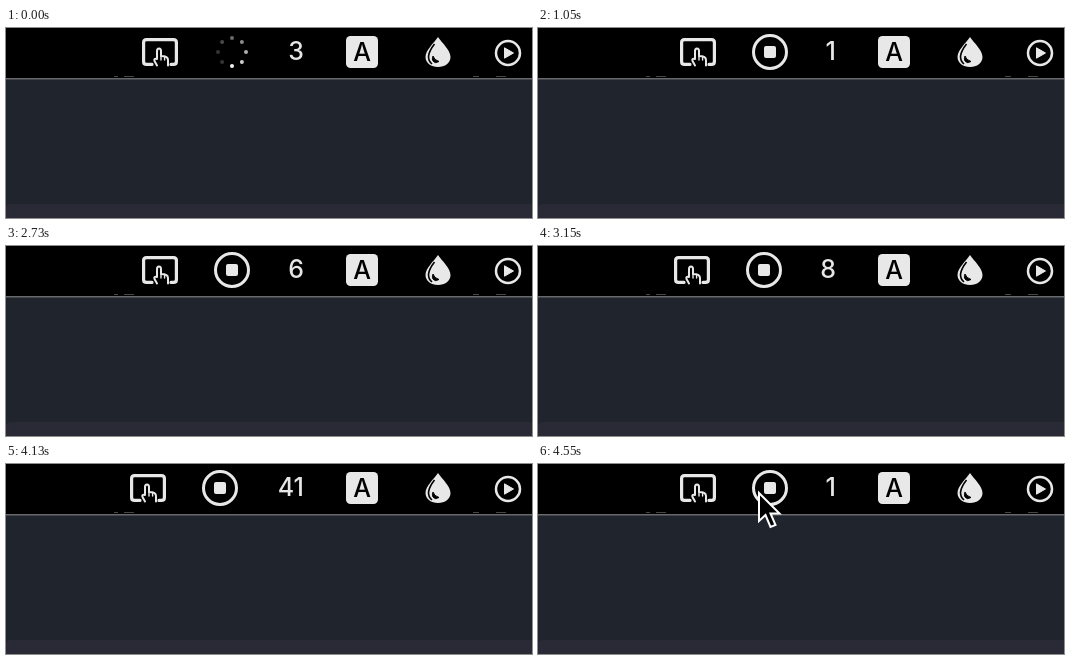
Recreate the animation shown at these times as an HTML page. Size 526x190 px, loop 4620 ms.

```html
<!DOCTYPE html>
<html lang="en">
<head>
<meta charset="utf-8">
<title>Menu bar status</title>
<style>
  html, body { margin: 0; width: 100%; height: 100%; overflow: hidden; background: #20252d; }
  svg { display: block; width: 526px; height: 190px; }
  text { font-family: Inter, "Liberation Sans", sans-serif; font-weight: 500; }
</style>
</head>
<body>
<svg viewBox="0 0 526 190" xmlns="http://www.w3.org/2000/svg">
  <rect width="526" height="190" fill="#20252d"/>
  <path d="M0 190V178Q2 176 6 176H526V190Z" fill="#292a36"/>
  <rect width="526" height="50" fill="#000"/>
  <rect y="50" width="526" height="1.5" fill="#66686b"/>
  <path d="M108 48.5h4M118 48.5h10M467 48.5h6M490 48.5h10" stroke="#777" stroke-width="1" opacity=".6"/>

  <g id="pad" fill="none" stroke="#e8e8e8" stroke-linejoin="round" stroke-linecap="round">
    <path stroke-width="3.2" d="M10 36.4H4.6Q1.6 36.4 1.6 33.4V14.6Q1.6 11.6 4.6 11.6H31.4Q34.4 11.6 34.4 14.6V33.4Q34.4 36.4 31.4 36.4H29"/>
    <path stroke-width="2" d="M15 37.5L12.5 33Q11.5 30 15 31V23Q15 20.5 17 20.5T19 23V28Q26 28 26 32V37.5"/>
    <path stroke-width="1.4" d="M19 28V32M22.6 29V32"/>
  </g>

  <g id="spin" fill="#f2f2f2"></g>
  <g id="stop">
    <circle r="16.5" fill="none" stroke="#e8e8e8" stroke-width="3"/>
    <rect x="-6" y="-6" width="12" height="12" rx="2" fill="#e8e8e8"/>
  </g>

  <text id="count" x="298" y="32" font-size="25" text-anchor="end" fill="#e6e6e6"></text>

  <rect x="340" y="8" width="32" height="32" rx="4.5" fill="#e8e8e8"/>
  <text x="356" y="33" font-size="25" text-anchor="middle" fill="#000">A</text>

  <path d="M432 9C428 15 419.5 22 419.5 29C419.5 35 425 39 432 39S444.500 35 444.500 29C444.500 22 436 15 432 9Z" fill="#e8e8e8"/>
  <path d="M428.500 16C423 23 420 31 426 36" fill="none" stroke="#000" stroke-width="1.6"/>
  <path d="M427 28Q428 32 433 33.500Q429 36 427 33Q425.800 31 427 28Z" fill="#000" stroke="#000"/>

  <circle cx="502" cy="25" r="12" fill="none" stroke="#e8e8e8" stroke-width="2.5"/>
  <path d="M498.500 19.800V30.200L507.500 25Z" fill="#e8e8e8" stroke="#e8e8e8" stroke-linejoin="round"/>

  <path id="cursor" d="M1 1V29L7.500 23L12.500 35L17.500 33L12.500 21.500H21.500Z" fill="#000" stroke="#fff" stroke-width="2"/>
</svg>
<script>
const LOOP = 4620, STEP = 70;
const SPIN_END = 560, CURSOR_IN = 4200, CURSOR_END = 4550;
const counts = [
  [0, 3], [350, 2], [560, 1], [1610, 3], [2030, 1], [2100, 7], [2170, 2],
  [2450, 1], [2520, 2], [2660, 4], [2730, 6], [3080, 5], [3150, 8],
  [3710, 28], [3780, 31], [3850, 34], [3920, 37], [4130, 41], [4340, 1]
];
const digitWidth = { 1: 9, 2: 14, 4: 18, 7: 13 };
const $ = id => document.getElementById(id);
const [pad, spin, stop, count, cursor] = ["pad", "spin", "stop", "count", "cursor"].map($);

const dots = Array.from({ length: 8 }, (_, i) => {
  const dot = document.createElementNS("http://www.w3.org/2000/svg", "circle");
  const a = i * Math.PI / 4;
  dot.setAttribute("cx", 14 * Math.sin(a));
  dot.setAttribute("cy", -14 * Math.cos(a));
  dot.setAttribute("r", 2);
  return spin.appendChild(dot);
});

const place = (el, x, y) => el.setAttribute("transform", `translate(${x} ${y})`);
const show = (el, on) => el.setAttribute("visibility", on ? "visible" : "hidden");

function render(ms) {
  const t = Math.floor(ms / STEP) * STEP;
  const label = String(counts.findLast(([at]) => at <= t)[1]);
  const width = [...label].reduce((sum, d) => sum + (digitWidth[d] || 15), 0);
  const left = 151 - width;

  count.textContent = label;
  place(pad, left, 0);
  place(spin, left + 90, 24);
  place(stop, left + 90, 24);
  show(spin, t < SPIN_END);
  show(stop, t >= SPIN_END);

  // The spinner pauses briefly between its two bursts.
  const turn = t < 350 ? Math.min(t, 210) / STEP : t / STEP - 1;
  dots.forEach((dot, i) => {
    const age = (4 + turn - i + 16) % 8;
    dot.setAttribute("opacity", Math.max(0.22, 1 - age * 0.14));
  });

  const p = Math.min(1, Math.max(0, (t - CURSOR_IN) / (CURSOR_END - CURSOR_IN)));
  const rest = (1 - p) ** 2;
  place(cursor, 220 + 278 * rest, 28 + 112 * rest);
  show(cursor, t >= CURSOR_IN);
}

const start = performance.now();
function tick() {
  render((performance.now() - start) % LOOP);
  requestAnimationFrame(tick);
}
render(0);
requestAnimationFrame(tick);
</script>
</body>
</html>
```
